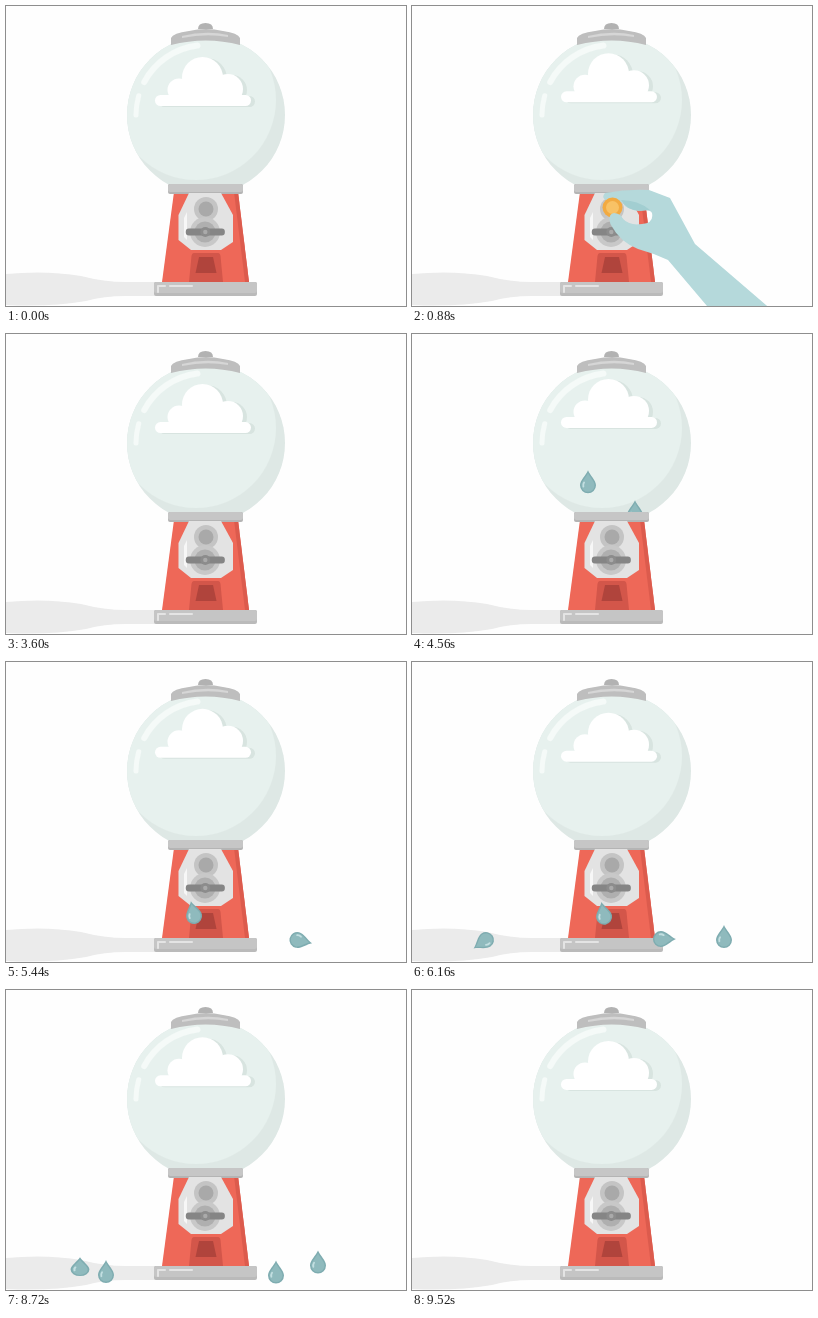
Animation of 400x300 px, one loop 9.6 s. Source, as an HTML page with a canvas:

```html
<!DOCTYPE html>
<html lang="en">
<head>
<meta charset="utf-8">
<title>Rain machine</title>
<style>
html, body { margin: 0; width: 100%; height: 100%; overflow: hidden; background: #fefefe; }
canvas { display: block; }
</style>
</head>
<body>
<canvas id="stage" width="400" height="300"></canvas>
<script>
const ctx = document.getElementById('stage').getContext('2d');
const LOOP = 9600, SETTLED = 1260;

const drops = [
  { fallX: 208, fall: 3500, exit: 4900, x: 312, y: 278, rise: 8440 },
  { fallX: 190, fall: 3670, exit: 5380, x: 74, y: 278, rise: 8590 },
  { fallX: 223, fall: 3833, exit: 5710, x: 270, y: 285.5, rise: 8740 },
  { fallX: 176, fall: 3960, exit: 6110, x: 100, y: 285, rise: 8890 }
];

const clamp = v => Math.max(0, Math.min(1, v));
const smooth = p => p * p * (3 - 2 * p);

// Eased value between [time, value] keys
function tween(t, keys) {
  let [t0, v0] = keys[0];
  for (const [t1, v1] of keys) {
    if (t < t1) return v0 + (v1 - v0) * smooth(clamp((t - t0) / (t1 - t0)));
    [t0, v0] = [t1, v1];
  }
  return v0;
}

function shape(d, color) {
  ctx.fillStyle = color;
  ctx.fill(new Path2D(d));
}

function circle(x, y, r, color) {
  ctx.fillStyle = color;
  ctx.beginPath();
  ctx.arc(x, y, r, 0, 2 * Math.PI);
  ctx.fill();
}

function box(x, y, w, h, r, color) {
  ctx.fillStyle = color;
  ctx.beginPath();
  ctx.roundRect(x, y, w, h, r);
  ctx.fill();
}

function arc(x, y, r, from, to, width, color) {
  ctx.strokeStyle = color;
  ctx.lineWidth = width;
  ctx.lineCap = 'round';
  ctx.beginPath();
  ctx.arc(x, y, r, from * Math.PI / 180, to * Math.PI / 180);
  ctx.stroke();
}

function at(x, y, degrees, draw) {
  ctx.save();
  ctx.translate(x, y);
  ctx.rotate(degrees * Math.PI / 180);
  draw();
  ctx.restore();
}

function drop(x, y, degrees = 0, sx = 1, sy = 1, alpha = 1) {
  at(x, y, degrees, () => {
    const body = 'M0-15C2-10 8-5 8 0A8 8 0 1 1-8 0C-8-5-2-10 0-15Z';
    ctx.globalAlpha = alpha;
    ctx.scale(sx, sy);
    shape(body, '#7eacb0');
    ctx.save();
    ctx.scale(.82, .82);
    shape(body, '#8fbabd');
    ctx.restore();
    arc(0, 0, 4.8, 165, 215, 1.8, '#c3dfe1');
  });
}

function cloud(y, dx, color) {
  at(dx, y, 0, () => {
    box(149, 89, 96, 11, 5.5, color);
    circle(173, 84, 11.5, color);
    circle(196.5, 71.5, 20.5, color);
    circle(222, 83, 15, color);
    box(170, 78, 54, 16, 0, color);
  });
}

function globe(t) {
  ctx.save();
  ctx.beginPath();
  ctx.arc(200, 109, 79, 0, 2 * Math.PI);
  ctx.clip();
  box(121, 30, 158, 158, 0, '#dee8e5');
  const storm = tween(t, [[2040, 0], [2700, 1], [3360, 0]]);
  const glass = [[231, 206], [241, 223], [238, 219]].map(([a, b]) => a + (b - a) * storm);
  circle(190, 94, 80, `rgb(${glass})`);
  arc(200, 109, 70, 208, 263, 6, '#f5faf8');
  arc(200, 109, 70, 180, 196, 5, '#f5faf8');

  for (const d of drops) {
    const age = t - d.fall;
    if (age > 0 && age < 900) drop(d.fallX, 87 + .000178 * age * age);
  }
  const bob = -3.2 + 3.2 * Math.cos(t * 2 * Math.PI * 3 / LOOP);
  cloud(bob + 1, 4, '#d8e4e0');
  cloud(bob, 0, '#fff');
  ctx.restore();

  shape('M165 39V32Q167 27 183 25Q200 21 217 25Q232 27 234 32V39Q200 30 165 39Z', '#bebebe');
  shape('M192 23Q192 17 199.5 17Q207 17 207 23Z', '#b2b2b2');
  shape('M176 30Q200 24 222 29L222 31Q200 27 176 32Z', '#d6d6d6');
}

function machine(t) {
  shape('M168 186H232L243 276H156Z', '#ee6858');
  shape('M228 186H232L243 276H239Z', '#dc5b4d');
  box(162, 178, 75, 10, 2, '#b4b4b4');
  box(162, 178, 75, 8, 2, '#c6c6c6');

  shape('M183 187H215L227 209V236L215 244H185L172.5 234V209Z', '#e3e3e3');
  shape('M178 212L181 206V234L178 231Z', '#f7f7f7');
  circle(200, 203, 12, '#c4c4c4');
  circle(200, 203, 7.5, '#a9a9a9');
  circle(199, 226, 15, '#c8c8c8');
  circle(199, 226, 10.5, '#afafaf');
  at(199.3, 226, tween(t, [[1440, 0], [1760, 80], [2160, 80], [2560, 0]]), () => {
    box(-19.5, -3.5, 39, 7, 3, '#858585');
    circle(0, 0, 5, '#8c8c8c');
    circle(0, 0, 2.2, '#aaa');
  });

  shape('M188 247H212Q214 247 214.5 250L217 276H183L185.5 250Q186 247 188 247Z', '#d3564a');
  shape('M193 251H207L210.5 267H189.5Z', '#b0443c');
  box(148, 276, 103, 14, 2, '#bababa');
  box(148, 276, 103, 11, 2, '#c5c5c5');
  box(152, 279, 8, 2, 1, '#e4e4e4');
  box(163, 279, 24, 2, 1, '#e4e4e4');
  box(151, 279, 2, 8, 1, '#e4e4e4');
}

function hand(t) {
  if (t < 320 || t > 2100) return;
  const skin = '#b5d9db';
  const dx = tween(t, [[320, 150], [880, 0], [1040, 0], [1280, 45], [1440, 0], [1760, 0], [2080, 85]]);
  const dy = tween(t, [[320, 115], [880, 0], [1040, 0], [1280, 28], [1440, 24], [1760, 24], [2080, 140]]);
  const turn = tween(t, [[1440, 0], [1760, 20]]);
  const inHand = draw => at(199 + dx, 226 + dy, turn, () => {
    ctx.translate(-199, -226);
    draw();
  });

  inHand(() => {
    shape(`M193 187Q215 183 237 184L258 192Q270 214 283 238L475 403H382L295 300L256 254
      Q241 247 226 243Q208 236 199 219Q195 208 202 207Q208 207 211 213Q218 220 230 218
      Q242 217 240 207Q238 203 228 205Q214 204 210 196L197 195Q188 193 193 187Z`, skin);
    shape('M209 194Q226 194 238 204Q233 204 228 205Q214 204 209 194Z', '#a2ced1');
  });
  const inserted = clamp((t - 1040) / 200);
  const held = t < 1040 ? 1 : 0;
  at(200.5 + dx * held, 201.5 + dy * held, 0, () => {
    ctx.scale(1 - inserted, 1);
    circle(0, 0, 10, '#f2aa42');
    circle(0, 0, 6.5, '#f8c266');
  });
  inHand(() => shape('M199 219Q195 208 202 207Q208 207 211 213L216 224Z', skin));
}

function spill(t) {
  for (const d of drops) {
    const age = t - d.exit;
    if (age <= 0) continue;
    if (age < SETTLED) {
      const side = Math.sign(d.x - 200);
      const travel = age < 460 ? age * .00155 : tween(age, [[460, .713], [660, 1]]);
      const y = Math.min(d.y, 260 - .12 * age + .00035 * age * age);
      const tilt = age < 460 ? age * .2
        : tween(age, [[460, 92], [720, 136], [1080, -16], [SETTLED, 0]]);
      const size = clamp(age / 50);
      drop(200 + (d.x - 200) * travel, y, side * tilt, size, size);
    } else {
      const p = (t - d.rise) / 630;
      if (p >= 1) continue;
      const squash = tween(p, [[0, 0], [.22, 1], [.45, 0]]);
      const lift = p > .25 ? ((p - .25) / .75) ** 2 * 36 : 0;
      drop(d.x, d.y - lift + squash * 1.5, 0, 1 + .18 * squash, 1 - .18 * squash,
        1 - clamp((p - .5) / .5));
    }
  }
}

function frame(t) {
  box(0, 0, 400, 300, 0, '#fefefe');
  shape('M0 268Q40 264 75 270Q98 276 120 276H150V290H120Q98 290 80 295Q45 301 0 299Z', '#ebebeb');
  globe(t);
  machine(t);
  spill(t);
  hand(t);
}

const start = performance.now();
function loop() {
  frame((performance.now() - start) % LOOP);
  requestAnimationFrame(loop);
}
loop();
</script>
</body>
</html>
```
